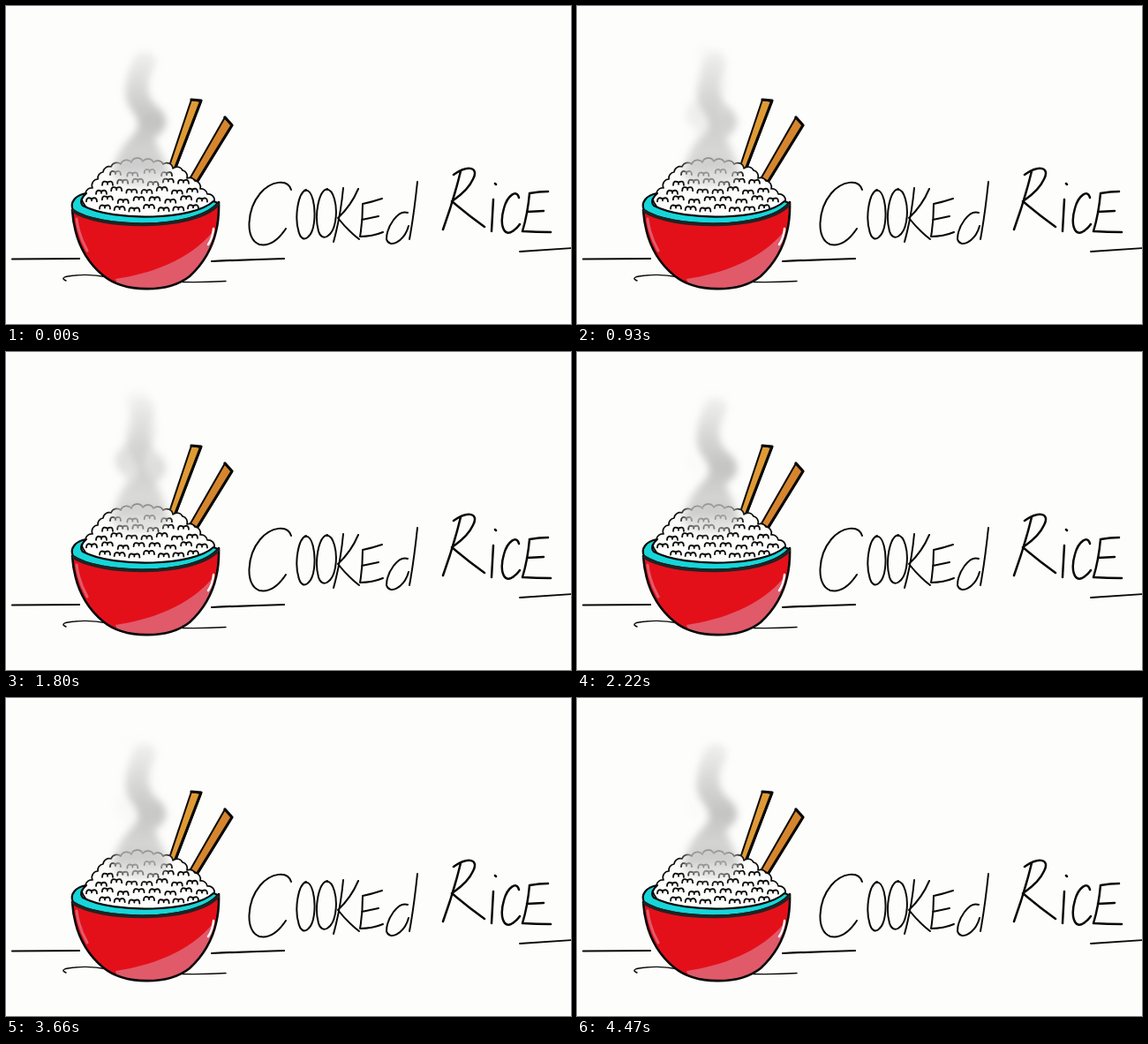
Write an HTML page that moves like this. It is 640 by 360 pixels and loops after 4500 ms.

```html
<!DOCTYPE html>
<html lang="en">
<head>
<meta charset="utf-8">
<title>Cooked Rice</title>
<style>
  html, body { margin: 0; width: 100%; height: 100%; overflow: hidden; background: #fdfdfb; }
  svg { display: block; width: 100vw; height: 100vh; }
</style>
</head>
<body>
<svg viewBox="0 0 640 360" fill="none" stroke="#080808" stroke-linecap="round" stroke-linejoin="round" role="img" aria-label="Cooked Rice">
  <defs>
    <linearGradient id="mist" gradientUnits="userSpaceOnUse" x1="0" y1="45" x2="0" y2="200">
      <stop offset="0" stop-color="#ccc" stop-opacity=".2"/>
      <stop offset=".3" stop-color="#bbb" stop-opacity=".55"/>
      <stop offset=".55" stop-color="#b4b4b4" stop-opacity=".8"/>
      <stop offset="1" stop-color="#c4c4c4" stop-opacity=".5"/>
    </linearGradient>
    <filter id="soft" filterUnits="userSpaceOnUse" x="60" y="10" width="200" height="230"><feGaussianBlur stdDeviation="4"/></filter>
    <clipPath id="body"><path d="M75 231C104 252 212 255 241 222C242 254 232 284 208 306C184 325 134 325 110 305C88 287 77 260 75 231Z"/></clipPath>
    <path id="plume" d="M147 54C139 72 132 92 137 108C142 121 153 127 149 138C144 150 124 160 122 188L183 188C181 170 167 155 169 149C183 141 186 127 173 115C159 104 157 88 169 67Q172 55 160 51Z"/>
  </defs>

  <!-- table lines -->
  <path stroke-width="2.2" d="M7 286.5Q45 286 83 286M233 289Q274 287 315 286"/>
  <path stroke-width="1.8" d="M582 278Q611 276 641 274"/>
  <path stroke-width="1.4" d="M68 311C61 308 66 306 78 305Q96 303 115 307M200 312.5Q225 313 249 311.5"/>

  <!-- chopsticks -->
  <g stroke-width="2">
    <path fill="#e09a35" d="M210 106L221 108L191 187L184 184Z"/>
    <path fill="#d5852d" d="M248 126L256 135L217 199L209 194Z"/>
    <path stroke-width="3.2" d="M210 106L221 107L191 185M248 126L256 135L217 198"/>
  </g>

  <!-- rice -->
  <path id="heap" fill="#fdfdfb" stroke-width="1.7"/>
  <path id="grains" stroke-width="1.9"/>

  <!-- bowl -->
  <g clip-path="url(#body)">
    <path fill="#e3101a" stroke="none" d="M70 215H245V325H70Z"/>
    <path fill="#e05a6a" stroke="none" d="M124 309C164 303 213 287 239 249L246 325H130Z"/>
    <path stroke="#e05a6a" stroke-width="3" d="M80 241Q82 259 92 277"/>
  </g>
  <path stroke="#fff" stroke-width="2.4" d="M235 252Q234 263 229 270"/>
  <path stroke-width="2.6" d="M75 231C77 260 88 287 110 305C134 325 184 325 208 306C232 284 242 254 241 222"/>
  <path fill="#16d6da" stroke-width="2.2" d="M91 212C78 214 72 223 76 231C104 251 212 255 240 223L235 221C213 242 123 245 87 226Q82 220 91 212Z"/>
  <path stroke="#222" stroke-width="3.8" d="M76 232C104 252 212 255 240 225"/>

  <!-- steam -->
  <g filter="url(#soft)" stroke="none">
    <ellipse cx="152" cy="188" rx="33" ry="17" fill="#d2d2d2" opacity=".65"/>
    <g fill="url(#mist)">
      <use id="steamA" href="#plume"/>
      <use id="steamB" href="#plume" transform="translate(305 -8) scale(-1 1)"/>
    </g>
  </g>

  <!-- lettering -->
  <g stroke-width="2">
    <path d="M323 208C319 195 300 198 288 212C273 230 270 264 287 270C301 273 311 261 317 252"/>
    <path d="M340 208C331 211 326 239 332 257C336 270 347 262 349 245C351 227 347 207 339 209"/>
    <path d="M364 207C354 209 349 237 354 255C358 268 370 261 373 244C376 226 371 206 362 208"/>
    <path d="M382 206Q379 238 371 267M399 207Q391 226 376 240Q387 254 400 264"/>
    <path d="M426 218Q414 222 404 224Q404 244 401 261Q415 261 427 256M403 242L422 238"/>
    <path d="M455 234C444 230 431 250 431 264C434 275 451 267 456 249M466 199Q462 237 457 264"/>
  </g>
  <g stroke-width="2.5">
    <path d="M515 187Q507 220 495 253M507 191C524 179 536 183 529 196C524 207 514 215 505 221Q524 237 542 250"/>
    <path d="M552 219Q551 238 550 255M554 201L555 202"/>
    <path d="M581 217C579 207 568 214 564 229C559 246 563 260 572 256Q578 253 582 247"/>
    <path d="M614 210Q604 210 593 212Q591 235 585 255Q601 256 617 256M590 233L609 232"/>
  </g>
</svg>
<script>
  const byId = id => document.getElementById(id);

  const rim = '90 212 98 206 104 196 110 188 119 182 130 179 142 177 155 176 167 177 178 179 189 184 200 186 205 195 214 198 220 207 228 213 236 221';
  const bumps = rim.replace(/(\d+ \d+) ?/g, 'A7 7 0 0 1 $1');
  byId('heap').setAttribute('d', `M87 222${bumps}L226 236L158 243L96 236Z`);

  const rows = [[189, 124, 182], [199, 115, 201], [209, 108, 211], [219, 97, 222], [229, 112, 212]];
  let marks = '';
  rows.forEach(([y, left, right], row) => {
    const count = Math.round((right - left) / 18);
    for (let i = 0; i <= count; i++) {
      const x = left + (right - left) * i / count;
      const dy = 2 * Math.sin(i * 2.3 + row);
      marks += `M${x - 6} ${y + dy + 2}q0-6 6-3q6-3 6 3m-6-3v2`;
    }
  });
  byId('grains').setAttribute('d', marks);

  // The plume fades into its mirror image and back.
  const LOOP = 4500, SWAY = 750;
  function draw(now) {
    const t = now % LOOP;
    const mix = (1 - Math.cos(t / SWAY * 2 * Math.PI)) / 2;
    byId('steamA').setAttribute('opacity', 1 - 0.5 * mix);
    byId('steamB').setAttribute('opacity', 0.55 * mix);
    requestAnimationFrame(draw);
  }
  draw(performance.now());
</script>
</body>
</html>
```
